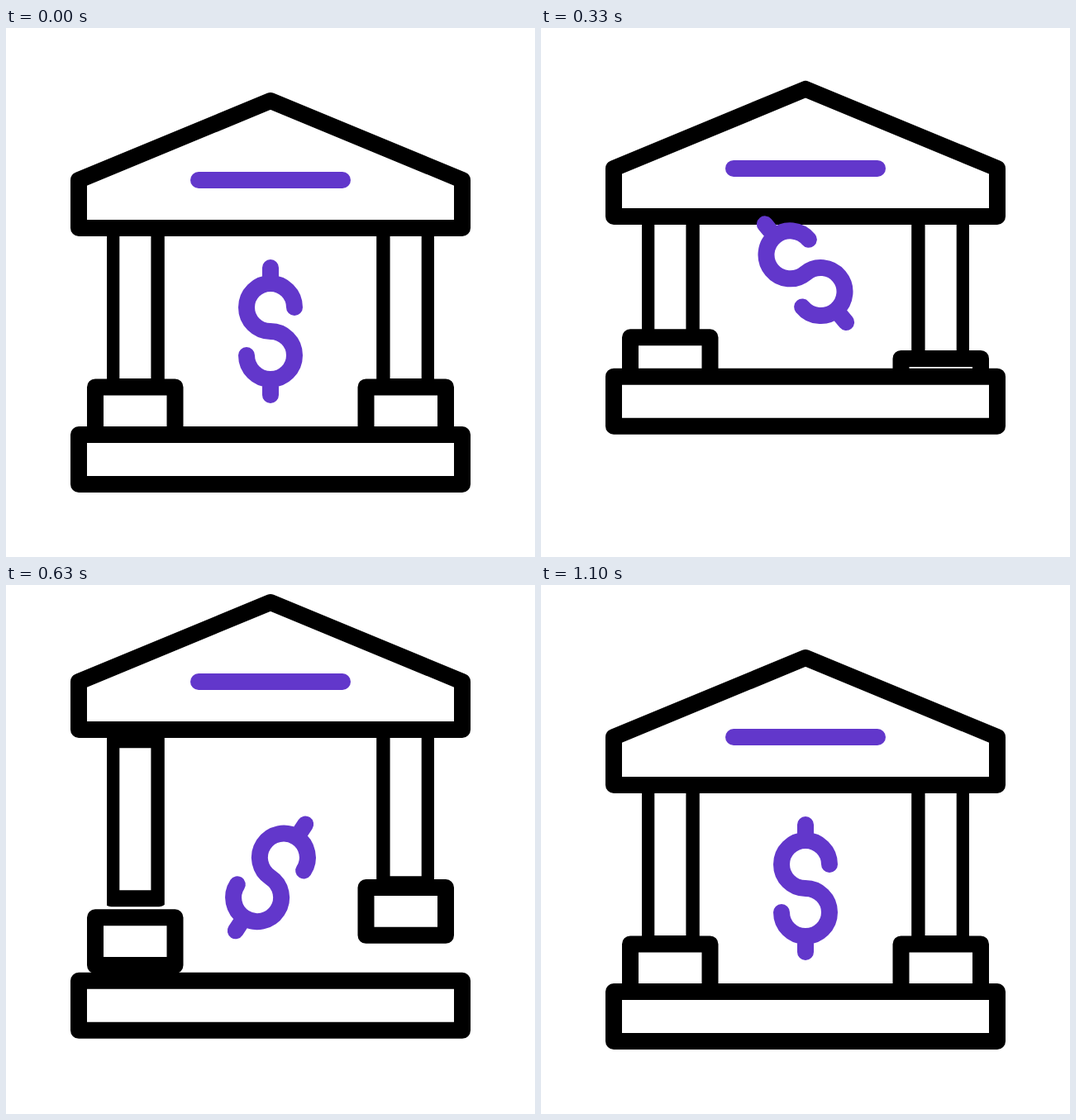
These frames come from a looping animation (640 px wide and 640 px high, 1.67 s). An HTML page:

```html
<!DOCTYPE html>
<html lang="en">
<head>
<meta charset="utf-8">
<title>Bank</title>
<style>
  html, body { margin: 0; width: 100%; height: 100%; overflow: hidden; background: #fff; }
  svg { display: block; width: 100%; height: 100%; }
  .ink { fill: #fff; stroke: #000; }
  .accent { fill: none; stroke: #6237cb; }
  .ink, .accent { stroke-width: 20; stroke-linejoin: round; stroke-linecap: round; }
</style>
</head>
<body>
<svg viewBox="0 0 640 640">
  <defs>
    <clipPath id="shaft"><rect x="122" y="220" width="69.8" height="240"/></clipPath>
    <g id="column" clip-path="url(#shaft)">
      <rect class="ink" x="127.3" y="242" width="58.1" height="192"/>
    </g>
    <rect id="plinth" class="ink" x="108" y="434.4" width="96.5" height="57.8"/>
  </defs>
  <g id="leftColumn"><use href="#column"/></g>
  <g id="rightColumn"><use href="#column" transform="translate(640) scale(-1 1)"/></g>
  <g id="leftPlinth"><use href="#plinth"/></g>
  <g id="rightPlinth"><use href="#plinth" transform="translate(640) scale(-1 1)"/></g>
  <rect id="base" class="ink" x="88" y="492" width="464" height="60"/>
  <g id="roof">
    <path class="ink" d="M320 88 552 184V242H88V184Z"/>
    <path class="accent" d="M233 184H407"/>
  </g>
  <g id="dollar">
    <path class="accent" d="M29-29A29 29 0 1 0 0 0A29 29 0 1 1-29 29M0-77V-58M0 58V77"/>
  </g>
</svg>
<script>
  const LOOP = 1670, LAST_STEP = 33, LIFT = 72, FALL = 11;

  // Each part hops once: start, top and drop, in steps of a thirtieth of a second.
  const hops = {
    base: [0, 11, 11],
    leftPlinth: [1.08, 13.1, 13.1],
    leftColumn: [2.16, 15.2, 15.5],
    rightPlinth: [3.2, 17.2, 17.5],
    rightColumn: [4.3, 19.4, 19.6],
    roof: [5.4, 21.6, 22]
  };

  const el = id => document.getElementById(id);

  function ease(from, to, step) {
    const x = Math.min(1, Math.max(0, (step - from) / (to - from)));
    return x * x * (3 - 2 * x);
  }

  function hop([start, top, drop], step) {
    return -LIFT * (ease(start, top, step) - ease(drop, drop + FALL, step));
  }

  // Winds back a little, then spins forward half a turn.
  function spin(step) {
    return -46.5 * ease(0, 13.2, step) + 226.5 * ease(13.2, 27.7, step);
  }

  // Steps begin at 0, 30 and 70 ms of every 100 ms.
  function stepAt(ms) {
    const part = ms % 100;
    const step = 3 * Math.floor(ms / 100) + (part >= 30) + (part >= 70);
    return Math.min(LAST_STEP, step);
  }

  function draw(ms) {
    const step = stepAt(ms % LOOP);
    for (const id in hops) {
      el(id).setAttribute("transform", `translate(0 ${hop(hops[id], step)})`);
    }
    const y = 367 + hop(hops.base, step);
    el("dollar").setAttribute("transform", `translate(320 ${y}) rotate(${spin(step)})`);
  }

  function tick() {
    draw(performance.now());
    requestAnimationFrame(tick);
  }
  tick();
</script>
</body>
</html>
```
